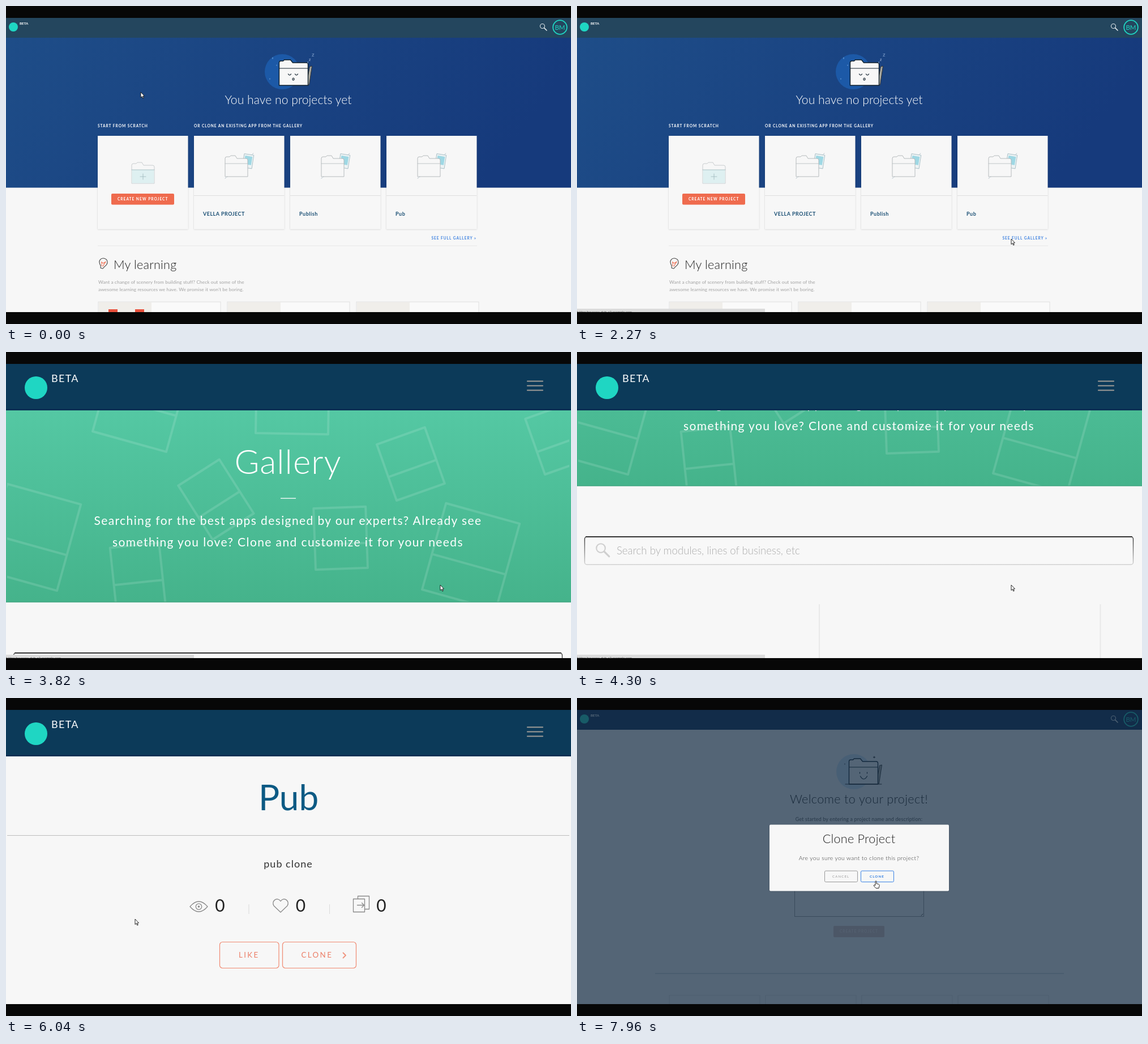
An HTML page for the animation above (8 s loop, 998 px wide and 561 px high).

```html
<!DOCTYPE html>
<html lang="en">
<head>
<meta charset="utf-8">
<title>Clone a project</title>
<style>
  html, body { margin: 0; width: 100%; height: 100%; overflow: hidden; background: #070707; }
  svg { display: block; width: 100%; height: 100%; font-family: Lato, "Open Sans", sans-serif; }
  text { white-space: pre; }
  .light { font-weight: 300; }
  .bold { font-weight: 700; }
  .italic { font-style: italic; }
  .mid { text-anchor: middle; }
  .line { fill: none; stroke-linecap: round; stroke-linejoin: round; }
</style>
</head>
<body>
<svg id="stage" viewBox="0 0 998 561"></svg>
<script>
const LOOP = 8000;
const PAPER = '#f7f7f7';
const TEAL = '#1fd6c3';

const text = (x, y, size, str, fill, cls = '', spacing = 0) =>
  `<text x="${x}" y="${y}" font-size="${size}" fill="${fill}" class="${cls}" letter-spacing="${spacing}">${str}</text>`;
const rect = (x, y, w, h, fill, extra = '') =>
  `<rect x="${x}" y="${y}" width="${w}" height="${h}" fill="${fill}" ${extra}/>`;
const path = (d, stroke, width = 1, extra = '') =>
  `<path class="line" d="${d}" stroke="${stroke}" stroke-width="${width}" ${extra}/>`;
const dot = (x, y, r, fill, extra = '') => `<circle cx="${x}" cy="${y}" r="${r}" fill="${fill}" ${extra}/>`;
const group = (id, body) => `<g id="${id}">${body}</g>`;
const at = (x, y, body) => `<g transform="translate(${x} ${y})">${body}</g>`;

// Icons
const magnifier = (scale, color, width) =>
  `<g transform="scale(${scale})">${dot(-1.5, -1.5, 4, 'none', `stroke="${color}" stroke-width="${width}"`)}${path('M1.6 1.6L6 6', color, width * 1.5)}</g>`;
const eye = path('M-15.5 0Q0-18 15.5 0Q0 18-15.5 0Z', '#8a8a8a', 1.3) +
  dot(0, 0, 5.2, 'none', 'stroke="#8a8a8a" stroke-width="1.3"') + dot(0, 0, 1.8, '#8a8a8a');
const heart = path('M0 12.5L-12 1C-17-7-6-16 0-7C6-16 17-7 12 1Z', '#8a8a8a', 1.3);
const cloneIcon = path('M-6-10V-14H14V9H7M-14-9H6V14H-14ZM-7 2H5M1-2L5 2L1 6', '#8a8a8a', 1.3);
const bulb = path('M168 459C160 451 166 445 171 445C178 445 181 452 175 459L173 463H169Z', '#444', 1.1) +
  path('M170 459L168 452L171 454L175 450L172 459', '#ef6b4e');

const homeHeader = fill => rect(0, 21, 998, 35, fill) + dot(13, 37, 8, TEAL) +
  text(24, 33, 6.2, 'BETA', '#fff', 'bold') + at(949, 37, magnifier(1, '#dfe6ea', 1.1)) +
  dot(978.5, 37.5, 12.3, 'none', `stroke="${TEAL}" stroke-width="1.8"`) +
  text(978.5, 41.5, 11.5, 'BM', TEAL, 'mid');

const mascot = face =>
  `<path d="M54 11L58 10L53 43H48Z" fill="#a9aaa2" stroke="#333"/>` +
  `<path d="M0 44V4Q0 1 3 1H7L9-1H20L24 4H48Q51 4 51 7V44Z" fill="#f7f7f7" stroke="#10202c" stroke-width="1.4"/>` +
  path('M0 14H51', '#10202c') + path(face, '#10202c', 1.2);

// Home
const folder = 'M0 37V5Q0 2 3 2H8L10 0H18L21 5H37Q40 5 40 8V37Z';
const photoFolder =
  path('M0 44L7 39M43 6L51-1', '#9fb2ba', .8, 'stroke-dasharray="2 1.6"') +
  `<g transform="rotate(9 42 14)">${rect(32, 2, 17, 24, '#eef3f4', 'stroke="#9db7bf" stroke-width=".8"')}${rect(34, 5, 13, 15, '#9fd8e4')}</g>` +
  `<path d="${folder}" transform="translate(0 4)" fill="${PAPER}" stroke="#aeb4b6" stroke-width=".9"/>` +
  path('M0 18H40', '#b9bfc1', .9);
const newFolder = `<path d="${folder}" fill="${PAPER}" stroke="#c3c8ca" stroke-width=".9"/>` +
  rect(.5, 13, 39, 23.5, '#def0f1') + path('M0 13H40M20 20V30M15 25H25', '#a3bcc0', .9);
const card = x => rect(x, 229, 159.5, 164.5, PAPER, 'filter="url(#shadow)"');
const appCard = (x, name) => card(x) + rect(x, 334, 159.5, 1, '#dedede') +
  at(x + 55, 260, photoFolder) + text(x + 16, 369.5, 9, name, '#1a4f74', 'bold', .5);
const lesson = x => rect(x, 522, 216, 30, '#fafafa', 'stroke="#e0e0e0"') + rect(x + 1, 522.5, 93, 30, '#f0eeea');

const home = rect(0, 21, 998, 519, PAPER) + rect(0, 56, 998, 264.5, 'url(#navy)') + homeHeader('#24465e') +
  dot(488, 116, 31, '#1c59a7') +
  path('M471 91V93M478 104V105M466 128V129', '#73a9df', 1.2) +
  at(482.5, 96, mascot('M16 24Q18.5 28 21 24M28 24Q30.5 28 33 24M23.5 33A1.5 2 0 1 0 26.5 33A1.5 2 0 1 0 23.5 33')) +
  text(532, 101, 5, 'z', '#b8cbe5') + text(535, 97, 7, 'z', '#b8cbe5') + text(540, 89, 10, 'z', '#86a5cf') +
  text(498.5, 173, 21.2, 'You have no projects yet', '#fff', 'light mid') +
  text(162, 214.3, 6.6, 'START FROM SCRATCH', '#fff', 'bold', .95) +
  text(332, 214.3, 6.6, 'OR CLONE AN EXISTING APP FROM THE GALLERY', '#fff', 'bold', .92) +
  card(162) + at(222, 276, newFolder) + rect(186, 331, 111, 19.5, '#ef6b4e', 'rx="2"') +
  text(197, 343.3, 6.6, 'CREATE NEW PROJECT', '#fff', 'bold', 1) +
  appCard(332, 'VELLA PROJECT') + appCard(502, 'Publish') + appCard(672, 'Pub') +
  text(751.5, 412.3, 6.5, 'SEE FULL GALLERY »', '#3f82e0', 'bold', 1) +
  rect(162, 422.5, 670, 1, '#e8e8e8') +
  `<g transform="rotate(14 171 455)">${bulb}</g>` +
  text(190, 463.5, 21.6, 'My learning', '#222', 'light', .2) +
  text(163, 490, 8.4, 'Want a change of scenery from building stuff? Check out some of the', '#a2a2a2', '', .06) +
  text(163, 502.5, 8.4, "awesome learning resources we have. We promise it won't be boring.", '#a2a2a2', '', .06) +
  [163, 391, 619].map(lesson).join('') + rect(181, 535, 16, 6, '#e8503c') + rect(228, 535, 16, 6, '#e8503c');

// Gallery: each sheet is its lower left corner, angle, size and fold height
const sheets = [
  [153, 140, 15.5, 135, 160, 66], [441, 143, 1, 128, 160, 63], [779, 59, 5, 86, 90, 42],
  [952, 216, -19.5, 90, 104, 42], [690, 262, -19.5, 90, 105, 44], [365, 331, -32.5, 86, 113, 46],
  [547, 384, -2, 92, 108, 44], [735, 419, 15.5, 135, 158, 65], [-40, 385, 15.5, 135, 158, 65],
  [195, 453, -6, 87, 108, 42]
];
const sheet = ([x, y, angle, w, h, fold]) =>
  path(`M0 0V${-h}H${w}V0ZM0 ${-fold}H${w}`, '#fff', 4, `stroke-opacity=".13" transform="translate(${x} ${y}) rotate(${angle})"`);
const summary = (x, name, views) => text(x, 968, 22.5, name, '#16416a', '', 1) + at(x + 15.5, 1005, eye) +
  text(x + 50, 1010, 18.5, views, '#777', 'bold') + rect(x + 90.5, 996, 1.3, 18, '#888');

const galleryCopy = text(498, 215, 60, 'Gallery', '#fff', 'light mid', 1) +
  text(498, 305, 21, 'Searching for the best apps designed by our experts? Already see', '#fff', 'mid', 1.4) +
  text(498, 343, 21, 'something you love? Clone and customize it for your needs', '#fff', 'mid', 1.4);
const pubHover = text(61, 700, 19, 'Published 3/25/16', '#333', 'light italic', .2) +
  rect(61, 721, 333, 1, '#e4e4e4') + text(61, 769.5, 22.5, 'Pub', '#0f4a78', '', 1) +
  text(61, 820, 18.5, 'pub clone', '#333', 'light', .5) + text(61, 962, 18.8, '#Pub', '#27b2e2', 'light', .2);
const gallery = rect(0, 21, 998, 519, PAPER) + group('scroller',
  rect(0, 21, 998, 420.5, 'url(#green)') + `<g clip-path="url(#hero)">${sheets.map(sheet).join('')}</g>` +
  rect(0, 440.5, 998, 1, '#3f9f7c') + rect(485, 257.5, 27, 1.3, '#fff') + group('galleryCopy', galleryCopy) +
  rect(13.5, 531, 969, 49, '#f8f8f8', 'rx="4" stroke="url(#inset)" stroke-width="1.4"') +
  path('M16 531H980', '#333', 1.8) + at(45, 554, magnifier(1.95, '#cfcfcf', 1.1)) +
  text(70, 562, 18.6, 'Search by modules, lines of business, etc', '#adadad', 'light') +
  rect(427, 650, 2, 500, '#e9e9e9') + rect(923.5, 650, 2, 500, '#e9e9e9') +
  group('pubPlain', summary(62, 'Pub', '0')) + group('pubHover', pubHover) + summary(558, 'Publish', '75'));

const wideHeader = rect(0, 21, 998, 82, '#0c3a59') + rect(0, 100, 998, 3, '#0a3054') + dot(53, 63, 20, TEAL) +
  text(80, 53, 18, 'BETA', '#fff', '', 1.3) + path('M921 51.5H948M921 59.5H948M921 67.5H948', '#a09c97', 2.2);

// Project detail
const button = (id, x, w, label, tx) => group(id,
  rect(x, 430.5, w, 46, '#ef8069', 'class="fill" fill-opacity="0" rx="5" stroke="#f08a72" stroke-width="1.2"') +
  text(tx, 457.5, 13.3, label, '#ec7f68', '', 2.4));
const counter = (x, icon, y, nx, id) => at(x, y, icon) + text(nx, 377, 30, `<tspan id="${id}">0</tspan>`, '#222', 'mid');
const detail = rect(0, 21, 998, 519, PAPER) +
  group('detailTitle', text(499, 198, 62, 'Pub', '#0c5a84', 'mid') + rect(2, 242, 993, 1, '#bcbcbc') +
    text(498.5, 299, 18, 'pub clone', '#333', 'mid', 1)) +
  group('detailCounts', counter(340.5, eye, 368, 378, 'views') + counter(485, heart, 365.5, 520.5, 'likes') +
    counter(627.5, cloneIcon, 363.5, 663, 'clones') + rect(428.5, 364, 1, 17, '#dadada') + rect(571, 364, 1, 17, '#dadada')) +
  group('detailButtons', button('like', 377.5, 104.5, 'LIKE', 411) +
    button('clone', 488.5, 130, 'CLONE', 521.5) + path('M595.5 449.5L600 454L595.5 458.5', '#f0937e', 1.8));

// Welcome page and dialog
const welcome = rect(0, 21, 998, 519, PAPER) + homeHeader('#0a2c58') + dot(489, 130, 31, '#cfe3f6') +
  path('M525 103V106M523.5 104.5H526.5M473 116V117', '#222') +
  at(480.5, 108, mascot('M19 23V25M32 23V25M20 30Q26 40 32 30')) + path('M474 152H538', '#222') +
  text(498, 186, 21.6, 'Welcome to your project!', '#222', 'light mid', .35) +
  text(498, 216.5, 8.9, 'Get started by entering a project name and description:', '#555', 'mid', .18) +
  rect(384.5, 300, 228, 85.5, 'none', 'stroke="#999"') + path('M608 384L611 381', '#444') +
  rect(453, 402, 90, 20, '#dcc6c2', 'rx="2"') + text(498, 414.3, 6.6, 'CREATE PROJECT', '#f5e5e2', 'bold mid', 1) +
  rect(138, 485.5, 722, 1, '#b4c0c8') + [163, 333, 503, 673].map(x => rect(x, 524.5, 160, 30, 'none', 'stroke="#e2e2e2"')).join('');
const dialog = rect(340, 223.5, 317, 117, PAPER, 'rx="2" filter="url(#shadow)"') +
  text(498, 256, 21.6, 'Clone Project', '#222', 'light mid', .25) +
  text(498, 286, 10.3, 'Are you sure you want to clone this project?', '#333', 'light mid', .4) +
  rect(437.5, 305, 58, 19.5, 'none', 'rx="2" stroke="#999"') + text(451, 317, 6, 'CANCEL', '#999', '', 1.2) +
  rect(501.5, 305, 58, 19.5, 'none', 'rx="2" stroke="#3a83e6"') + text(517, 317, 6.2, 'CLONE', '#2d7be0', 'bold', 1.1);

const pointer = (id, d) => `<path id="${id}" d="${d}" fill="#fff" stroke="#111" stroke-width=".9"/>`;
const cursors = pointer('arrow', 'M0 0V9.5L2.2 7.5L3.8 11L5.3 10.3L3.7 7L6.5 6.8Z') +
  pointer('hand', 'M-1 8V1Q0-.6 1 1V5L5 6Q6.6 6.6 6 9L5 13H0L-4 8.5Q-3.5 6-1 8Z');

const gradient = (id, x2, y2, from, to) =>
  `<linearGradient id="${id}" x2="${x2}" y2="${y2}"><stop stop-color="${from}"/><stop offset="1" stop-color="${to}"/></linearGradient>`;

document.getElementById('stage').innerHTML = `<defs>
  ${gradient('navy', 1, .2, '#1e4d88', '#163a7c')}${gradient('green', 0, 1, '#58cda9', '#45b38b')}${gradient('inset', 0, 1, '#333', '#d2d2d2')}
  <clipPath id="hero">${rect(2, 21, 993, 420, '#000')}</clipPath>
  <filter id="shadow" x="-5%" y="-5%" width="110%" height="110%"><feDropShadow dx="0" dy=".5" stdDeviation=".9" flood-opacity=".2"/></filter>
</defs>` +
  group('home', home) + group('blank', rect(0, 21, 998, 519, PAPER)) + group('gallery', gallery) +
  group('detail', detail) + group('wideHeader', wideHeader) + group('welcome', welcome) +
  group('dim', rect(0, 21, 998, 519, '#152d45')) + group('dialog', dialog) +
  group('status', rect(0, 534, 332, 7, '#dcdcdc') + text(-5, 541.5, 6, '<tspan id="statusText"></tspan>', '#555')) +
  group('cursor', cursors) + rect(0, 0, 998, 21, '#070707') + rect(0, 540, 998, 21, '#070707');

const el = Object.fromEntries([...document.querySelectorAll('#stage [id]')].map(node => [node.id, node]));

// Keys: time, then values
const cursorPath = [[390, 238, 152], [510, 535, 310], [710, 535, 310], [920, 746, 389], [1080, 746, 389],
  [1440, 767, 411], [4810, 767, 411], [5060, 228, 390], [6040, 228, 390], [6820, 530, 451],
  [7830, 530, 451], [7955, 528, 322.5]];
const scrollPath = [[4150, 0], [4300, 205], [4460, 370], [4660, 473]];
const statusTexts = [[0, 'www-dub-a2.example.com/gallery/project/publish-1'], [1250, 'www-dub-a2.example.com/gallery/projects/all'],
  [2270, 'Waiting for www-dub-a2.example.com'], [3320, 'Waiting for static-assets.www-dub-a2.example.com'],
  [3820, 'Waiting for www-dub-a2.example.com'], [6000, 'www-dub-a2.example.com/project/clone']];

const smooth = u => u * u * (3 - 2 * u);
function sample(keys, t, ease = u => u) {
  const next = keys.findIndex(key => key[0] > t);
  if (next === 0) return keys[0].slice(1);
  if (next < 0) return keys.at(-1).slice(1);
  const [t0, ...a] = keys[next - 1], [t1, ...b] = keys[next];
  const u = ease((t - t0) / (t1 - t0));
  return a.map((v, i) => v + (b[i] - v) * u);
}
const show = (id, on) => { el[id].style.display = on ? '' : 'none'; };
const setText = (id, value) => { if (el[id].textContent !== value) el[id].textContent = value; };

function render(t) {
  const during = (...spans) => spans.some(([from, to]) => t >= from && t < to);
  const [x, y] = sample(cursorPath, t, smooth);
  const overPub = t > 4810 && x < 428;

  show('home', t < 2630);
  show('blank', during([2630, 2760]));
  show('gallery', during([2760, 5250]));
  show('galleryCopy', t >= 2960);
  show('wideHeader', during([2960, 7450]));
  show('pubHover', overPub);
  show('pubPlain', !overPub);
  el.scroller.setAttribute('transform', `translate(0 ${-sample(scrollPath, t)[0]})`);

  show('detail', during([5250, 7450]));
  show('detailTitle', t >= 5580);
  show('detailCounts', t >= 5700);
  show('detailButtons', t >= 5810);
  const overLike = t > 6040 && x > 425 && x < 482;
  const overClone = during([6040, 7250]) && x >= 488;
  for (const [id, over] of [['like', overLike], ['clone', overClone]]) {
    el[id].querySelector('.fill').setAttribute('fill-opacity', over ? .12 : 0);
  }
  el.detailButtons.setAttribute('opacity', t >= 7250 ? .6 : 1);
  setText('clones', t >= 7250 ? '1' : '0');

  show('welcome', t >= 7450);
  show('dim', t >= 7490);
  el.dim.setAttribute('opacity', t < 7540 ? .4 : .72);
  show('dialog', t >= 7540);

  show('status', during([800, 4500], [6640, 7450]));
  setText('statusText', statusTexts.findLast(([from]) => t >= from)[1]);

  const pointing = during([460, 1110], [1330, 1740], [4960, 5250], [7900, LOOP]) || overLike || overClone;
  show('hand', pointing);
  show('arrow', !pointing);
  el.cursor.setAttribute('transform', `translate(${x} ${y})`);
}

let start;
function frame(now) {
  start ??= now;
  render((now - start) % LOOP);
  requestAnimationFrame(frame);
}
render(0);
requestAnimationFrame(frame);
</script>
</body>
</html>
```
